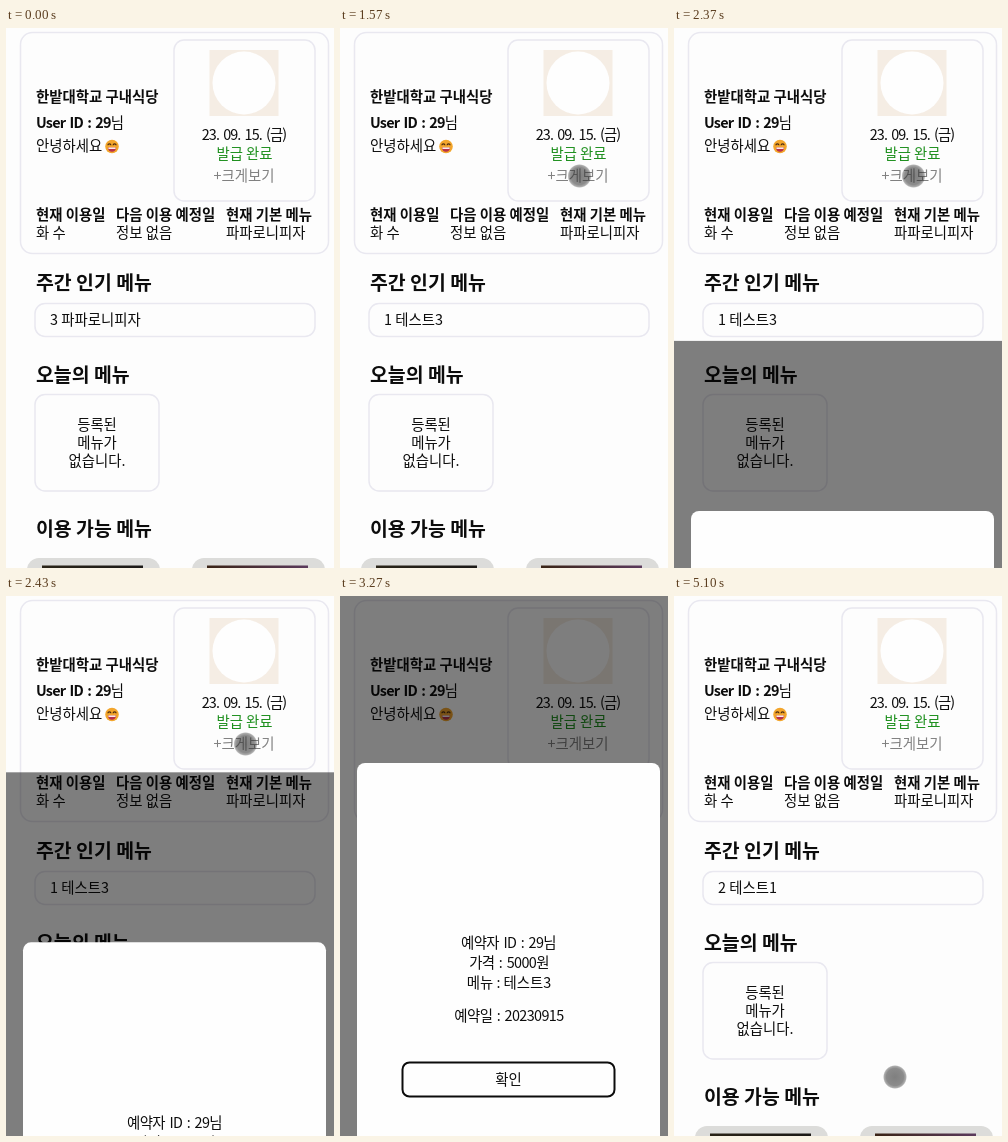
Animation, 328 px wide and 540 px high, one loop 5630 ms. Source, as an HTML page with a canvas:

```html
<!DOCTYPE html>
<html lang="ko">
<head>
<meta charset="utf-8">
<title>구내식당</title>
<style>
html, body { margin: 0; width: 100%; height: 100%; overflow: hidden; background: #fdfdfd; }
canvas { display: block; width: 328px; height: 540px; }
</style>
</head>
<body>
<canvas id="stage"></canvas>
<script>
const W = 328, H = 540, LOOP = 5630;
const FONT = '"Noto Sans CJK KR", "Noto Sans CJK", "Noto Sans", sans-serif';
const PAPER = '#fdfdfd', EDGE = '#e9e8f0', INK = '#0c0c0c';
const canvas = document.getElementById('stage');
const ctx = canvas.getContext('2d');
const dpr = window.devicePixelRatio || 1;
canvas.width = W * dpr;
canvas.height = H * dpr;

const clamp = v => Math.min(1, Math.max(0, v));
const lerp = (a, b, p) => a + (b - a) * p;

// Timing curve with control points (a, 0) and (b, 1).
function ease(a, b, t) {
  if (t <= 0 || t >= 1) return clamp(t);
  let lo = 0, hi = 1, s = 0.5;
  for (let i = 0; i < 24; i++) {
    s = (lo + hi) / 2;
    const x = 3 * (1 - s) * (1 - s) * s * a + 3 * (1 - s) * s * s * b + s * s * s;
    if (x < t) lo = s; else hi = s;
  }
  return s * s * (3 - 2 * s);
}

// Text placed by the middle of its line.
function text(str, x, midY, { size = 14.4, weight = 400, color = INK, align = 'left', gap = 0, word = 0 } = {}) {
  ctx.font = `${weight} ${size}px ${FONT}`;
  ctx.letterSpacing = gap + 'px';
  ctx.wordSpacing = word + 'px';
  ctx.textAlign = align;
  ctx.fillStyle = color;
  ctx.fillText(str, x, midY + size * 0.37);
}

function box(x, y, w, h, r, fill, stroke, line = 1.5) {
  ctx.beginPath();
  ctx.roundRect(x, y, w, h, r);
  if (fill) { ctx.fillStyle = fill; ctx.fill(); }
  if (stroke) { ctx.strokeStyle = stroke; ctx.lineWidth = line; ctx.stroke(); }
}

function disc(x, y, r, fill) {
  ctx.beginPath();
  ctx.arc(x, y, r, 0, Math.PI * 2);
  ctx.fillStyle = fill;
  ctx.fill();
}

function smiley(x, y) {
  disc(x, y, 6.8, '#f3a62c');
  ctx.strokeStyle = '#4a2a10';
  ctx.lineWidth = 1.2;
  for (const dx of [-2.6, 2.6]) {
    ctx.beginPath();
    ctx.arc(x + dx, y - 1.2, 1.5, Math.PI, 0);
    ctx.stroke();
  }
  ctx.beginPath();
  ctx.arc(x, y + 1, 4.2, 0, Math.PI);
  ctx.fillStyle = '#b8304a';
  ctx.fill();
  ctx.fillStyle = '#fff';
  ctx.fillRect(x - 3.6, y + 1, 7.2, 1.4);
}

function popular(t) {
  const p = ease(0.42, 0.58, (t - 1390) / 180);
  ctx.save();
  ctx.beginPath();
  ctx.rect(40, 280, 260, 24);
  ctx.clip();
  if (t >= 4400) text('2 테스트1', 44, 292);
  else {
    if (p < 1) text('3 파파로니피자', 44, 292 - 24 * p);
    if (p > 0) text('1 테스트3', 44, 316 - 24 * p);
  }
  ctx.restore();
}

function menuCard(x, from, to) {
  box(x, 530, 133, 40, 12, '#dcdcda');
  const g = ctx.createLinearGradient(x + 15, 0, x + 116, 0);
  g.addColorStop(0, from);
  g.addColorStop(1, to);
  ctx.fillStyle = g;
  ctx.fillRect(x + 15, 537.5, 101, 10);
}

function page(t) {
  ctx.fillStyle = PAPER;
  ctx.fillRect(0, 0, W, H);

  box(14.5, 4.5, 308, 221, 12, null, EDGE);
  box(168, 12, 141, 161, 10, null, EDGE);
  ctx.fillStyle = '#f5ede4';
  ctx.fillRect(203.5, 22, 69, 66);
  disc(238, 55, 31.5, '#fefefe');

  const bold = { weight: 700 }, mid = { align: 'center' };
  text('한밭대학교 구내식당', 30, 69, bold);
  text('User ID : 29', 30, 95, { weight: 700, gap: -0.8, word: 1.8 });
  text('님', 30 + ctx.measureText('User ID : 29').width, 95);
  text('안녕하세요', 30, 118);
  smiley(106, 118.5);

  text('23. 09. 15. (금)', 238, 106.5, { align: 'center', gap: -0.9, word: 1.8 });
  text('발급 완료', 238.5, 126, { align: 'center', color: '#1c8f1c' });
  text('+크게보기', 238, 148, { align: 'center', color: '#808080' });

  [[30, '현재 이용일', '화 수'], [110, '다음 이용 예정일', '정보 없음'], [220, '현재 기본 메뉴', '파파로니피자']]
    .forEach(([x, label, value]) => {
      text(label, x, 187, bold);
      text(value, x, 205);
    });

  const head = { size: 19.4, weight: 700 };
  text('주간 인기 메뉴', 30, 255, head);
  box(29, 275.5, 280, 33, 10, null, EDGE);
  popular(t);

  text('오늘의 메뉴', 30, 347, head);
  box(29, 366.5, 124, 96.5, 10, null, EDGE);
  ['등록된', '메뉴가', '없습니다.'].forEach((s, i) => text(s, 91, 397 + 18 * i, mid));

  text('이용 가능 메뉴', 30, 501, head);
  menuCard(21, '#2a2418', '#1c1a18');
  menuCard(186, '#3a2416', '#5b3a5c');
}

// Dimming layer and dialog travel together as one sheet.
function sheet(t) {
  const up = ease(0.66, 0.3, (t - 2050) / 700);
  const down = ease(0.42, 0.58, (t - 4900) / 200);
  const y = lerp(-3, 540, 1 - up + down);
  if (y >= H) return;

  ctx.fillStyle = 'rgba(0,0,0,0.5)';
  ctx.fillRect(0, y, W, H - y);

  const top = y + 170;
  box(17, top, 303, 560, 8, '#fefefe');
  const line = { align: 'center', gap: -0.6, word: 1.8 };
  text('예약자 ID : 29님', 168.5, top + 180, line);
  text('가격 : 5000원', 169, top + 200, line);
  text('메뉴 : 테스트3', 169, top + 220, { align: 'center' });
  text('예약일 : 20230915', 169, top + 253, line);
  box(62.5, top + 299.5, 212, 34, 7, null, '#0c0c0c', 2);
  text('확인', 168.5, top + 317, { align: 'center' });
}

// Visible spans: start, end, travel time, from x/y, to x/y.
const touches = [
  [870, 1030, 130, 305, 160, 305, 153],
  [1200, 3270, 30, 233, 148, 239.5, 148],
  [3870, LOOP, 230, 232, 501, 221, 481]
];

function pointer(t) {
  const hit = touches.find(([a, b]) => t >= a && t < b);
  if (!hit) return;
  const [a, , d, x0, y0, x1, y1] = hit;
  const p = clamp((t - a) / d);
  const x = lerp(x0, x1, p), y = lerp(y0, y1, p);
  const g = ctx.createRadialGradient(x, y, 0, x, y, 12);
  g.addColorStop(0, 'rgba(50,50,50,0.62)');
  g.addColorStop(0.72, 'rgba(50,50,50,0.56)');
  g.addColorStop(0.9, 'rgba(50,50,50,0.4)');
  g.addColorStop(1, 'rgba(50,50,50,0)');
  disc(x, y, 12, g);
}

function draw(now) {
  const t = now % LOOP;
  ctx.setTransform(dpr, 0, 0, dpr, 0, 0);
  page(t);
  sheet(t);
  pointer(t);
}

const start = performance.now();
function tick() {
  draw(performance.now() - start);
  requestAnimationFrame(tick);
}
tick();
</script>
</body>
</html>
```
